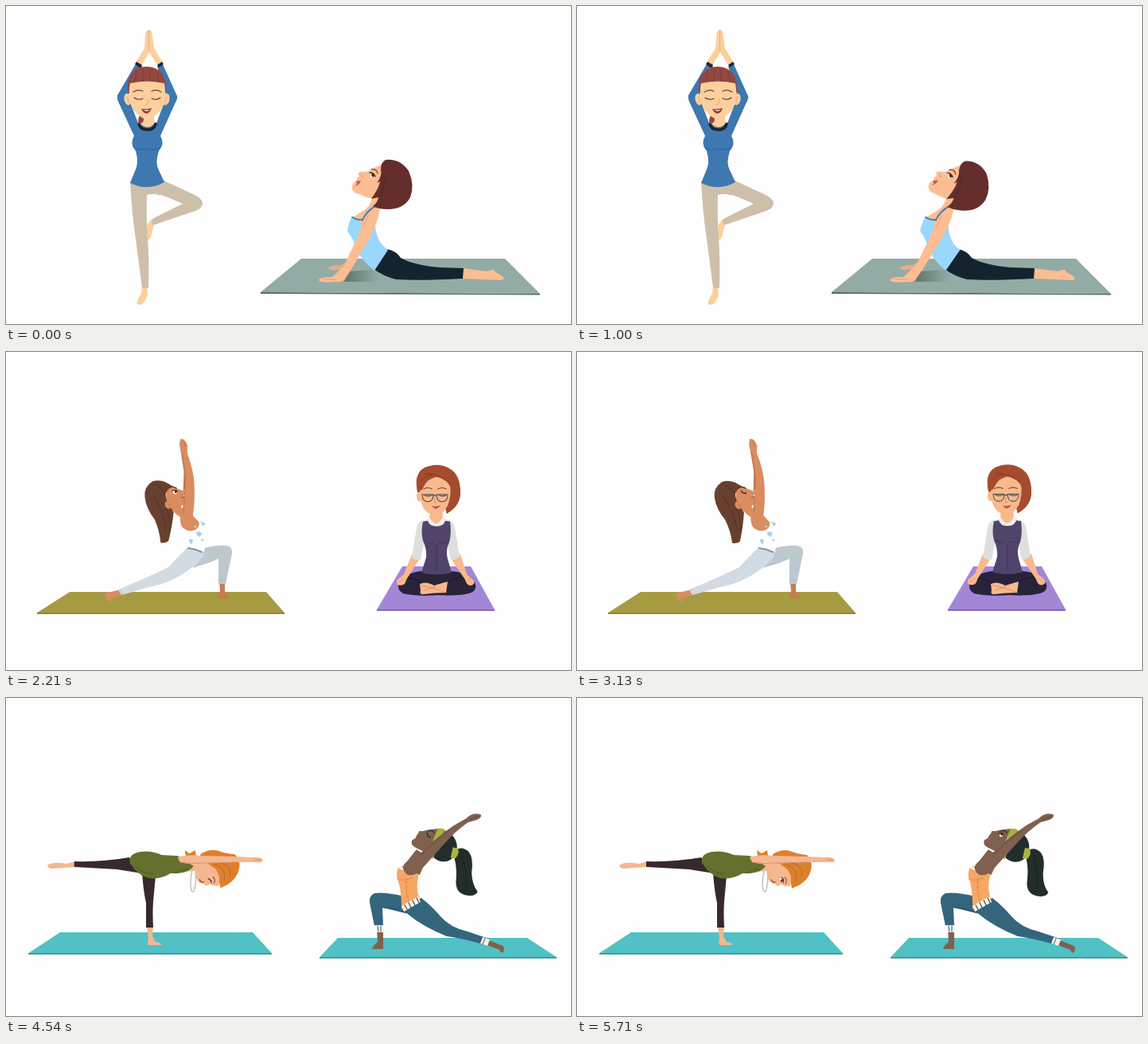
An HTML page with a canvas that plays this animation: 710x399 px, repeating every 5.75 s.

```html
<!DOCTYPE html>
<html lang="en">
<head>
<meta charset="utf-8">
<title>Yoga poses</title>
<style>
html, body { margin: 0; width: 100%; height: 100%; overflow: hidden; background: #fefefe; }
canvas { display: block; }
</style>
</head>
<body>
<canvas id="stage" width="710" height="399"></canvas>
<script>
const ctx = document.getElementById('stage').getContext('2d');
const LOOP = 5750, PART = LOOP / 3;
ctx.lineCap = ctx.lineJoin = 'round';

function fill(color, d) {
  ctx.fillStyle = color;
  ctx.fill(new Path2D(d));
}
function line(color, width, d) {
  ctx.strokeStyle = color;
  ctx.lineWidth = width;
  ctx.stroke(new Path2D(d));
}
function oval(color, x, y, rx, ry, a = 0) {
  ctx.fillStyle = color;
  ctx.beginPath();
  ctx.ellipse(x, y, rx, ry, a, 0, Math.PI * 2);
  ctx.fill();
}
function group(draw, set) {
  ctx.save();
  set();
  draw();
  ctx.restore();
}
// Sideways sway growing with the height above y0
const lean = (y0, k, draw) => group(draw, () => ctx.transform(1, 0, -k, 1, k * y0, 0));
const shift = (x, y, draw) => group(draw, () => ctx.translate(x, y));
const turn = (x, y, a, draw) => group(draw, () => {
  ctx.translate(x, y);
  ctx.rotate(a);
  ctx.translate(-x, -y);
});
function mat(color, edge, x1, x2, top, x3, x4, bottom) {
  fill(edge, `M${x4} ${bottom - 1} L${x3} ${bottom - 1} V${bottom + .8} H${x4} Z`);
  fill(color, `M${x1} ${top} H${x2} L${x3} ${bottom - .7} H${x4} Z`);
}

function tree() {
  const skin = '#fccf9c', blue = '#3d78b0', hair = '#954740', pants = '#cebfab', ink = '#1c2430';
  fill(skin, 'M183 267 L178 274 Q176 286 178 293 Q181 294 183 287 L186 273 Z');
  fill(skin, 'M171 352 L170 361 Q164 369 165 374 Q169 377 174 371 L178 363 L177 352 Z');
  fill(pants, 'M156 220 Q158 260 163 292 L171 354 H179 Q180 318 178 290 Q176 262 177 236 L188 235 Q197 237 222 248 L184 267 Q182 271 185 275 L238 257 Q247 254 247 247 Q246 241 235 236 L198 219 Z');
  line('#b9aa97', .8, 'M177 236 Q186 234 194 237');
  fill(skin, 'M179 30 Q175 31 175 39 L174 53 L163 71 L170 75 L180 58 L190 74 L197 71 L186 53 L184 38 Q183 30 181 30 Z');
  line('#dca273', .8, 'M179.5 31 V56');
  fill(blue, 'M164 71 L171 76 L153 113 L166 147 H189 L202 113 L190 76 L196 71 L215 113 Q216 116 212 123 L194 163 Q200 173 192 182 Q187 197 192 206 L199 221 Q178 233 156 222 L163 205 Q167 196 163 182 Q155 173 161 163 L142 122 Q139 116 140 112 Z');
  fill(ink, 'M164 70 L171 74 L169 78 L162 73 Z M190 74 L196 70 L198 73 L192 77 Z');
  line('#2e6297', 1, 'M160 177 Q167 183 176 179 Q187 183 194 177');
  fill(skin, 'M170 132 H185 L187 147 Q178 157 168 147 Z');
  line(ink, 3.6, 'M167 148 Q169 155 176 155 Q186 156 188 148');
  fill(hair, 'M168 137 Q164 146 168 148 Q174 147 173 139 Z');
  oval(skin, 153, 117, 4.5, 7.5, -.2);
  oval(skin, 201, 117, 4.5, 7.5, .2);
  line('#de9f76', .8, 'M152 114 Q154 116 154 121 M202 114 Q200 116 200 121');
  fill(skin, 'M155 94 Q154 120 160 130 Q170 142 177 142 Q185 142 195 130 Q201 120 200 94 Z');
  fill(hair, 'M153 112 Q150 76 177 76 Q204 77 201 112 L199 97 Q177 92 156 97 Z');
  line('#743835', .7, 'M164 82 L162 94 M172 79 V94 M181 79 V94 M190 82 L192 94');
  line('#7b4035', 1.2, 'M160 108 Q166 104 172 107 M183 107 Q189 104 195 108');
  line('#58362d', 1.1, 'M161 115 Q166 119 172 116 M183 116 Q189 119 194 115');
  line('#dca077', .9, 'M178 117 Q180 124 175 124');
  fill('#943b3c', 'M170 129 Q177 130 183 128 Q181 135 176 135 Q172 134 170 129 Z');
  fill('#fff', 'M172 130 Q178 131 181 130 Q179 132 176 132 Z');
  oval('#4377a9', 156, 128, .9, 1.6);
  oval('#4377a9', 198, 128, .9, 1.6);
}

function cobra(p) {
  const skin = '#fdbd92', hair = '#642e2c', top = '#99d7fe';
  fill('#52675f', 'M320 359 L671 361 L671 362.5 L320 361 Z');
  fill('#93aba5', 'M371 317 H627 L671 361 L320 359 Z');
  const g = ctx.createLinearGradient(428, 0, 468, 0);
  g.addColorStop(0, '#627870');
  g.addColorStop(1, '#93aba5');
  ctx.fillStyle = g;
  ctx.fill(new Path2D('M430 333 L462 331 L474 346 H425 Z'));

  lean(342, .04 * p, () =>
    fill('#ecab82', 'M442 290 L430 320 L421 325 Q409 325 405 329 Q407 332 416 331 L430 332 L452 296 Z'));
  fill(skin, 'M574 329 L604 333 Q614 329 614 333 L625 340 Q627 343 622 344 L574 342 Z');
  fill('#14242f', 'M479 305 Q490 307 496 316 Q512 325 545 328 L575 329 L574 342 Q520 345 490 343 Q474 339 462 330 Z');
  lean(342, .04 * p, () => {
    fill(skin, 'M461 238 Q458 253 447 258 L436 265 L436 273 L452 279 L467 268 L473 240 Z');
    fill(top, 'M435 264 Q429 275 429 283 Q437 292 439 303 Q448 321 463 332 L480 306 Q466 297 464 276 L460 271 Q453 283 446 271 Z');
    line('#4083ae', 2, 'M435 265 Q441 269 449 268 Q452 258 463 252');
    fill(skin, 'M460 254 Q467 253 468 261 Q467 271 460 285 L433 332 L427 341 Q422 348 414 346 Q397 348 393 344 Q394 340 410 340 L425 326 L445 282 Q448 266 453 259 Z');
    line('#d98c6d', .7, 'M400 343 L415 343 M449 277 L455 263');
    line('#4083ae', 1.7, 'M448 269 Q451 261 460 254');
    turn(454, 262, .065 * p, () => {
      fill(skin, 'M472 199 Q459 204 456 207 Q451 209 448 208 Q441 208 443 212 L444 214 Q440 215 441 218 L438 221 Q434 224 435 229 Q436 235 444 236 Q455 242 466 242 L477 218 Z');
      fill(hair, 'M471 205 Q471 196 477 193 Q495 191 506 207 Q514 225 508 240 Q500 255 480 255 Q468 255 461 251 Q467 247 468 240 L459 242 Q469 228 470 220 L466 222 Q473 213 471 205 Z');
      line('#4e211f', .8, 'M470 239 Q476 226 475 214');
      fill('#c95857', 'M440 220 L446 219 Q445 224 439 226 L441 223 Z');
      oval('#fff', 460, 213, 2.6, 2.1, -.8);
      oval('#342a2b', 461, 212.5, 1.6, 2.2, -.6);
      line('#42282a', 1.3, 'M457 209 Q462 209 464 214');
      line('#703e38', 1.2, 'M459 205 Q466 204 467 210');
      line('#dc8d70', .8, 'M446 212 Q449 213 449 215');
    });
  });
}

function lunge(p, shut) {
  const skin = '#d98d60', hair = '#68402f';
  mat('#a69b41', '#817725', 80, 327, 301, 350, 39, 328);
  fill('#c77b51', 'M268 287 L269 301 Q265 306 267 309 L280 309 Q282 307 275 302 L275 287 Z');
  fill('#bec8cf', 'M245 247 Q264 242 277 243 Q285 244 284 253 L276 291 H267 L267 259 L235 271 Z');
  line('#a9b4bd', .8, 'M267 286 H276 M266 259 Q253 266 243 267');
  fill(skin, 'M144 298 L132 301 Q124 301 124 305 Q128 314 132 314 Q131 308 138 308 L148 304 Z');
  fill('#d2dae2', 'M228 245 L249 252 Q245 264 233 271 Q208 290 180 295 L145 305 L141 298 Q180 282 204 270 Q219 254 228 245 Z');
  line('#b4bdc6', .8, 'M143 298 L147 304');
  lean(246, -.023 * p, () => {
    fill('#fff', 'M222 211 L227 245 L249 251 L253 214 Z');
    fill(skin, 'M207 189 Q210 203 219 207 L222 216 L236 211 L225 195 Z');
    turn(215, 208, -.045 * p, () => {
      fill(skin, 'M202 165 Q211 167 215 171 L225 175 Q227 178 224 180 L226 185 Q225 195 216 199 Q208 202 202 192 Z');
      fill(hair, 'M210 169 Q198 158 185 162 Q174 169 175 181 Q176 195 187 210 Q193 224 194 239 Q201 240 204 237 Q209 218 211 201 Q207 194 203 189 L201 178 Q204 171 210 169 Z');
      line('#52301f', .8, 'M199 190 Q209 208 205 226 M185 179 Q199 201 201 222 M188 166 Q196 169 201 179');
      oval(skin, 204, 192, 3.7, 5, -.5);
      line('#b96f48', .8, 'M204 190 Q207 191 206 195');
      if (shut) line('#432b25', 1.4, 'M209 174 Q211 178 215 177');
      else {
        oval('#fff', 213, 176, 2.6, 2.1, .4);
        oval('#3b2925', 214, 175, 1.5, 2, .2);
        line('#432b25', 1.1, 'M210 174 Q213 172 216 175');
      }
      line('#513226', 1.2, 'M207 170 Q211 168 215 171');
      line('#a75748', 1.2, 'M221 183 L225 182');
    });
    oval('#fff', 222, 194, 1.5, 1.7);
    fill('#c57a51', 'M220 123 L224 150 L223 176 L230 165 L228 123 Z');
    fill(skin, 'M220 109 Q218 115 219 119 Q220 125 223 128 L226 153 Q226 165 225 183 L221 203 Q217 209 221 219 Q227 226 235 224 Q243 222 243 214 L235 205 Q238 188 237 165 Q236 147 228 126 L229 118 Q226 108 220 109 Z');
    line('#b66c45', .8, 'M222 112 Q225 111 225 118 M226 158 Q225 181 223 202');
    const spot = '#a9d3e6';
    fill(spot, 'M244 212 L251 215 L248 219 Z M230 235 L235 235 L234 241 L231 240 Z');
    fill(spot, 'M239 227 Q243 223 245 227 L247 226 L244 232 L240 230 Z');
    oval(spot, 247, 236, 1.8, 1.3);
    oval('#c9e4ee', 238, 219, 1.4, 1);
    line('#8b929d', 2, 'M229 246 Q238 247 246 251');
  });
}

function lotus(p) {
  const skin = '#f8b98c', hair = '#a64c2e', dark = '#29233a', sleeve = '#dedfdd', vest = '#51446a';
  mat('#a486d7', '#7552a4', 498, 584, 269, 614, 466, 324);
  fill(dark, 'M521 275 Q502 277 494 289 Q490 298 499 303 Q518 307 542 305 Q578 307 588 300 Q594 292 584 283 Q576 276 560 275 Z');
  fill(skin, 'M520 291 Q528 287 538 293 L555 288 L553 302 Q538 302 524 304 Q519 304 521 299 Z');
  line('#d78e69', .9, 'M522 293 Q540 296 553 302 M526 299 L540 294');
  line('#151323', .8, 'M555 288 Q568 282 575 282 M521 289 Q510 283 503 283');
  shift(0, -.8 * p, () => {
    fill(skin, 'M510 254 L500 279 L491 287 Q490 293 496 293 Q502 293 503 286 L519 261 Z M560 261 L577 286 Q579 294 585 293 Q591 291 587 286 L579 279 L571 254 Z');
    line('#d78e69', .7, 'M494 289 L500 284 M580 284 L586 290');
    fill(sleeve, 'M526 211 Q518 212 516 221 L510 258 Q514 262 521 261 L526 238 Z M555 211 Q562 212 564 221 L570 257 Q564 262 559 261 L554 238 Z');
    fill('#eeefed', 'M524 212 L536 207 H547 L557 212 L553 222 H528 Z');
    fill(vest, 'M524 213 L530 212 Q532 219 541 219 Q550 219 552 212 L558 213 Q560 228 557 239 Q552 249 555 260 L560 277 Q541 282 522 277 L528 258 Q529 248 524 237 Q521 226 524 213 Z');
    line('#3b3051', .8, 'M526 237 Q532 242 538 239 M544 239 Q551 242 556 237 M541 242 V275');
    fill(skin, 'M534 196 H548 L549 207 Q541 224 532 207 Z');
    line('#e09d74', 1, 'M535 203 Q540 207 547 201');
    fill(hair, 'M518 178 Q511 154 525 147 Q541 137 558 147 Q571 154 571 177 Q571 193 554 203 L546 178 Z');
    oval(skin, 519.5, 182, 3.5, 6, -.1);
    fill(skin, 'M520 166 Q519 191 527 199 Q534 206 540 206 Q549 204 555 193 Q560 181 558 165 L542 156 Z');
    fill(hair, 'M517 176 L523 173 Q529 159 539 157 Q554 158 559 171 Q560 188 553 203 Q571 195 571 174 Q568 147 548 143 Q524 141 519 152 Q514 163 517 176 Z');
    line('#843720', .8, 'M525 153 Q544 151 558 165 M522 161 Q527 154 536 155');
    line('#83442d', 1.2, 'M525 172 Q530 169 535 172 M543 172 Q548 169 553 172');
    line('#684238', 1.1, 'M526 180 Q531 182 535 180 M544 180 Q549 182 553 180');
    line('#565458', 1.1, 'M523 179 H537 Q537 188 530 188 Q523 188 523 179 Z M541 179 H555 Q555 188 548 188 Q541 188 541 179 Z M537 181 Q539 179 541 181');
    line('#d58c69', .9, 'M539 183 L538 189 L541 189');
    fill('#bf5148', 'M534 193 Q540 195 546 192.5 Q543 197 539 197 Z');
  });
}

function balance(p, shut) {
  const skin = '#f5b78f', hair = '#dd802d', leg = '#37292e', top = '#65702f';
  mat('#50c1c4', '#2f878e', 68, 310, 294, 334, 28, 321);
  fill(skin, 'M177 286 L179 302 Q177 309 180 310 L195 310 Q196 307 188 306 L184 299 L185 286 Z');
  fill(leg, 'M171 220 Q173 245 176 257 L176 288 H185 Q184 270 185 255 L188 223 Z');
  shift(1 - 1.5 * p, 0, () => {
    fill(skin, 'M88 205 L76 208 Q61 205 53 209 Q51 213 57 214 L88 212 Z');
    fill(leg, 'M86 205 Q121 206 155 200 L172 220 Q158 218 140 215 L86 212 Z');
    fill(hair, 'M226 198 L225 191 L231 195 L238 191 L239 198 Z');
    fill(skin, 'M216 198 L240 204 L252 210 L238 217 L224 218 Z');
    fill(top, 'M156 207 Q154 195 169 193 Q183 191 196 197 L216 198 L236 211 Q232 218 217 220 L207 220 Q194 228 180 226 Q169 223 162 215 Z');
    line('#4b551f', .8, 'M163 211 Q171 221 185 220 M213 220 Q220 214 229 215');
    turn(238, 209, -.025 * p, () => {
      fill(hair, 'M245 196 Q256 189 267 192 Q276 196 288 197 Q296 205 293 216 Q290 228 278 235 L269 239 L266 221 L244 207 Z');
      fill(skin, 'M237 209 Q240 217 238 224 Q241 233 247 233 L251 236 L256 234 Q261 237 267 236 Q271 224 262 214 L250 205 Z');
      fill(hair, 'M246 203 Q258 206 264 214 Q270 224 269 239 Q273 232 279 229 Q289 222 287 209 L268 201 Z');
      line('#b75e20', .8, 'M260 208 Q278 213 274 230 M268 207 Q286 211 281 224');
      oval(skin, 262, 218, 3, 4, -.4);
      if (shut) line('#553129', 1.3, 'M254 227 Q258 229 258 232');
      else {
        oval('#fff', 256, 228, 2.3, 1.9, .6);
        oval('#3c302d', 256.5, 229, 1.4, 2, .6);
        line('#553129', 1, 'M256 225 Q260 227 258 232');
      }
      line('#ae5a28', 1.2, 'M260 225 Q264 228 261 233');
      line('#be4849', 1.5, 'M243 228 Q245 232 248 231');
    });
    line('#c5c2b9', 1.5, 'M234 217 Q231 230 233 241 Q236 246 237 240 Q240 229 238 217');
    fill(skin, 'M216 200 Q226 196 247 198 L289 199 L309 200 Q320 199 323 203 Q323 207 316 206 L290 206 L244 208 Q230 209 219 206 Z');
    line('#d28a66', .8, 'M219 206 Q232 209 247 207 L290 206 M312 203 H321');
  });
}

function crescent(p, shut) {
  const skin = '#80604f', hair = '#222e2c', pants = '#34657d', band = '#a8b63d';
  mat('#50c1c4', '#2f878e', 417, 655, 301, 692, 394, 326);
  fill(skin, 'M466 291 L467 306 Q460 312 460 315 H474 L474 291 Z M604 303 L622 310 Q628 311 625 319 Q622 321 620 316 L602 309 Z');
  fill(pants, 'M501 249 Q476 243 463 245 Q456 248 457 257 L463 286 H474 L473 263 L502 270 L514 256 Z');
  fill(pants, 'M496 264 L522 251 Q535 261 546 274 Q558 288 580 293 L607 302 L603 310 Q576 302 554 299 Q524 287 506 272 Z');
  fill('#f5f4ed', 'M463 285 H474 L475 294 H465 Z M599 300 L608 303 L605 311 L596 308 Z');
  line('#3f4e56', 1, 'M467 286 L468 293 M471 286 V293 M602 302 L599 309');
  line('#254e63', .8, 'M474 263 Q489 263 503 270');
  lean(265, .013 - .02 * p, () => {
    fill('#fbe3cd', 'M495 212 L505 204 L517 219 Z');
    fill(skin, 'M498 213 L516 190 L530 199 L520 222 Z');
    turn(527, 200, -.02 * p, () => {
      fill(hair, 'M562 195 Q572 184 582 194 Q588 202 585 220 Q585 235 592 244 Q589 251 576 248 Q565 245 565 232 Q567 214 564 203 Z');
      line('#111e1c', .8, 'M572 195 Q580 218 578 239');
      oval(hair, 549, 186, 18, 20, -.4);
      fill(skin, 'M546 164 Q531 165 525 167 L520 167 Q519 171 517 172 L515 176 L511 178 Q508 184 516 188 Q527 193 535 200 L550 179 Z');
      fill(band, 'M544 164 Q550 163 553 166 Q545 178 537 202 L531 199 Q536 180 544 164 Z');
      fill(band, 'M562 188 L568 189 Q571 196 565 202 L559 201 Z');
      oval(skin, 535, 185, 2.7, 4, .4);
      line('#a85552', 1.8, 'M515 177 L519 179');
      if (shut) line('#332621', 1.3, 'M530 169 Q530 174 534 175');
      else {
        oval('#fff', 532, 172, 2.5, 2.1, -.5);
        oval('#241f1d', 532.5, 171, 1.4, 1.8);
        line('#332621', 1.1, 'M529 170 Q533 168 535 172');
      }
      line('#3c2a24', 1.3, 'M531 167 Q536 165 539 169');
      oval('#f1d25d', 536, 191, 1.3, 1.6);
    });
    fill('#f7a765', 'M493 213 Q490 220 492 227 Q497 239 497 265 L520 252 Q514 238 519 221 L504 219 Z');
    line('#d7833f', .8, 'M503 226 Q502 241 506 257 M492 227 Q501 231 510 225');
    line('#d7833f', .7, 'M501 232 L505 230 M502 238 L506 236');
    fill('#f7f3e9', 'M497 261 L518 249 L521 256 L500 268 Z');
    line('#394a4e', 1.2, 'M501 260 L504 265 M506 257 L509 263 M511 254 L514 260 M516 251 L519 257');
    fill(skin, 'M501 208 Q512 198 523 193 Q542 174 563 160 L579 151 Q586 143 597 146 Q599 150 592 153 L581 156 Q564 168 552 182 Q533 203 525 212 Q516 224 505 222 Q496 216 501 208 Z');
    line('#604335', .8, 'M522 197 Q539 179 558 166 M583 152 L595 148');
  });
}

const scenes = [
  p => { tree(); cobra(p); },
  (p, shut) => { lunge(p, shut); lotus(p); },
  (p, shut) => { balance(p, shut); crescent(p, shut); }
];

function frame(now) {
  const t = now % LOOP;
  const i = Math.min(2, Math.floor(t / PART));
  const breath = (1 - Math.cos((t / PART - i) * Math.PI * 2)) / 2;
  ctx.fillStyle = '#fefefe';
  ctx.fillRect(0, 0, 710, 399);
  scenes[i](breath, breath > .6);
  requestAnimationFrame(frame);
}
requestAnimationFrame(frame);
</script>
</body>
</html>
```
